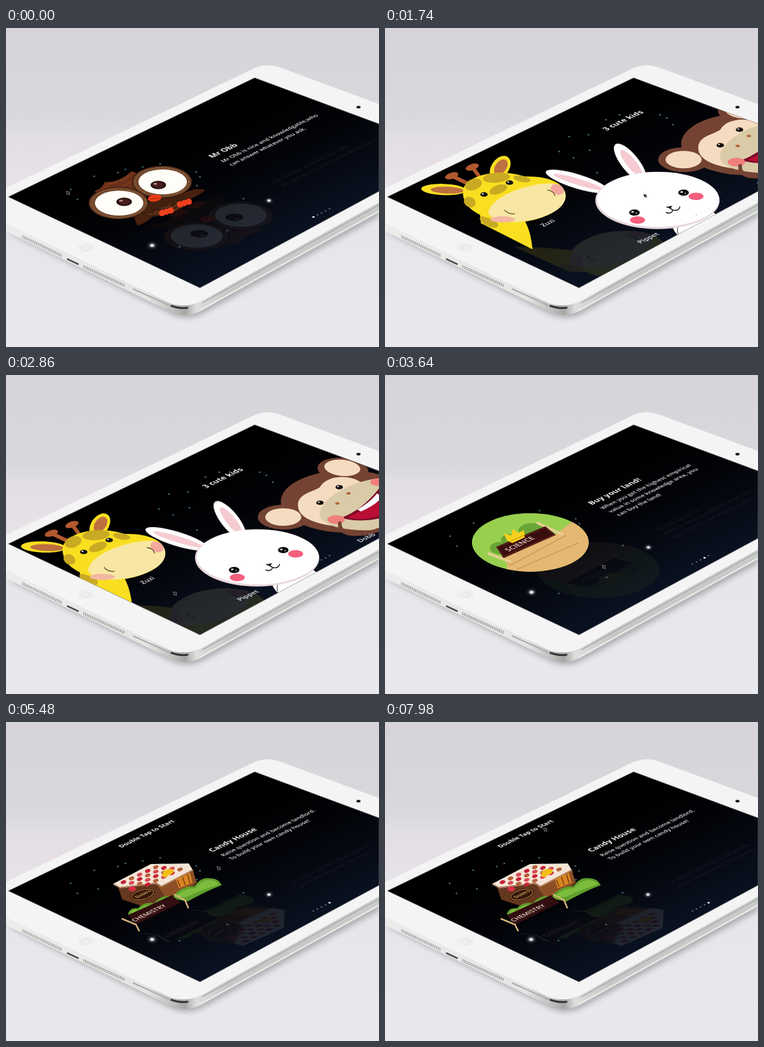
These frames come from a looping animation (600x512 px, 8 s). An HTML page:

```html
<!DOCTYPE html>
<html lang="en">
<head>
<meta charset="utf-8">
<title>Tablet story</title>
<style>
html, body { margin: 0; width: 100%; height: 100%; overflow: hidden; background: #e8e7eb; }
svg { display: block; width: 600px; height: 512px; }
text { font-family: "Open Sans", "Noto Sans", sans-serif; }
</style>
</head>
<body>
<svg id="stage" viewBox="0 0 600 512"></svg>
<script>
// Shape helpers; all art is laid out in stage coordinates.
const oval = (x, y, rx, ry, fill, turn = 0, extra = '') =>
  `<ellipse cx="${x}" cy="${y}" rx="${rx}" ry="${ry}" fill="${fill}" transform="rotate(${turn} ${x} ${y})" ${extra}/>`;
const shape = (d, fill, extra = '') => `<path d="${d}" fill="${fill}" ${extra}/>`;
const line = (d, color, width = 1, extra = '') =>
  `<path d="${d}" fill="none" stroke="${color}" stroke-width="${width}" stroke-linecap="round" ${extra}/>`;
// Text lying on the tilted screen; side = -1 gives its mirror image.
const label = (x, y, size, weight, words, fill = '#e4e4e6', side = 1) =>
  `<text transform="matrix(.9 -.443 ${.88 * side} ${.42 * side} ${x} ${y})" font-size="${size}" font-weight="${weight}" fill="${fill}">${words}</text>`;

const star = ([x, y]) => oval(x, y, 1.6, 1.2, '#3f6b72');
const glow = (x, y, r) => oval(x, y, r * 2, r * 1.5, 'url(#glow)');
const pageStars = [[104, 259], [115, 275], [148, 268], [142, 238], [180, 232], [192, 227], [220, 223], [248, 218],
  [306, 231], [312, 239], [307, 253], [382, 274], [279, 351], [356, 325]].map(star).join('') +
  glow(423, 277, 4) + glow(235, 349, 5);
const kidStars = [[246, 215], [262, 191], [269, 225], [295, 213], [293, 188], [321, 164], [343, 156],
  [408, 156], [419, 161], [429, 172], [307, 249]].map(star).join('');

function copy(title, lines, mirrorX, mirrorY) {
  const last = lines.length - 1;
  return label(332, 209, 12.5, 700, title, '#f2f2f2') + lines.map((words, i) =>
    label(350 + 13 * i, 216 + 5.5 * i, 9.3, 600, words) +
    label(mirrorX + 13 * (last - i), mirrorY + 5.5 * (last - i), 9.3, 600, words, '#151922', -1)).join('');
}

function owl() {
  const eye = (x, y, px, py) =>
    oval(x, y, 48.5, 26, '#2f170e') + oval(x, y, 47, 25, '#6d4429') +
    oval(x, y, 43, 22.5, 'none', 0, 'stroke="#9c6a42" stroke-width="1.5" stroke-dasharray="2 2"') +
    oval(x + 1, y, 39, 20, '#fffdf8') + oval(px, py, 12.5, 6.8, '#28100f') +
    oval(px, py, 9, 4.8, '#471c1b') + oval(px - 5, py - 2, 3, 1.6, '#b28d86');
  const foot = (x, y) => [-7, 0, 7].map(d => oval(x + d, y - d * .3, 5, 5, '#f0401e')).join('');
  return shape('M142 262 Q153 260 159 247 Q180 249 202 230 Q212 232 216 240 L230 270 L160 276Z', '#6b3019') +
    line('M146 261 Q160 260 163 250 Q185 250 203 233 M165 260 Q190 258 207 241', '#a84f28', 1, 'stroke-dasharray="2 1.5"') +
    shape('M278 268 Q300 256 321 259 Q312 269 292 276Z', '#48200f') +
    shape('M206 304 L211 317 Q226 314 238 300 L226 292Z', '#48200f') +
    shape('M215 294 Q248 255 286 262 Q304 278 282 290 Q252 304 228 303Z', '#41200f') +
    [0, 1, 2].map(i => line(`M${228 + i * 12} ${298 - i} q8 4 13 -4 q8 3 12 -6 q8 2 11 -7`, '#7c4126', 1.2)).join('') +
    eye(181, 281, 190, 279) + eye(251, 247, 245, 252) +
    oval(239, 273, 11, 5.5, '#e83c17', -8) + line('M232 274 L246 273', '#8f1f0c', .8) +
    foot(258, 295) + foot(287, 281);
}

function giraffe() {
  const horn = (x, y, tx, ty) => line(`M${x} ${y} L${tx} ${ty}`, '#b2592f', 6) + oval(x, y, 11, 5, '#b2592f', -18);
  const spot = (x, y, rx, ry, turn) => oval(x, y, rx, ry, '#c8aa23', turn);
  return shape('M118 310 L188 322 Q200 340 203 372 L120 330Z', '#f9df20') +
    spot(133, 328, 16, 7, 25) +
    horn(73, 254, 98, 266) + horn(106, 240, 119, 257) +
    oval(60, 276, 36, 9, '#f9df20', 2) + oval(66, 277, 27, 5.5, '#bd7040', 2) +
    oval(151, 241, 14, 21, '#f9df20', 36) + oval(152, 240, 9, 14, '#bd7040', 36) +
    shape('M91 279 C92 255 145 240 190 255 C228 254 254 265 256 284 C258 317 183 338 145 325 C115 319 90 304 91 279Z', '#f9df20') +
    spot(108, 268, 14, 9, -20) + spot(145, 257, 22, 8, -5) + spot(102, 296, 10, 8, 30) +
    spot(186, 259, 14, 5, 10) + spot(148, 276, 15, 7, -20) +
    shape('M132 314 C135 285 205 262 243 267 C260 276 262 295 242 309 C213 329 145 338 132 314Z', '#f8e7a4') +
    oval(155, 324, 20, 5, '#f3b7a2') + oval(243, 276, 11, 8, '#f3a79d', 25) +
    line('M158 309 Q164 316 174 315 M227 277 Q237 278 239 286', '#5b4526', 1.3) +
    oval(125, 284, 6, 3.6, '#111') + oval(123, 283, 1.6, 1, '#fff') +
    oval(166, 265, 6, 3.6, '#111') + oval(164, 264, 1.6, 1, '#fff');
}

function rabbit() {
  const eye = (x, y) => oval(x, y, 8.5, 5, '#0c0c0e') + oval(x - 3, y - 1, 2, 1.3, '#fff') + oval(x + 3, y + 1, 1.2, .8, '#fff');
  const ear = (x, y, rx, ry, turn) => oval(x, y, rx, ry, '#ecdfe2', turn) + oval(x, y, rx - 1, ry - 1, '#fff', turn) +
    oval(x + 2, y + 1, rx - 11, ry - 6.5, '#f5cbd1', turn);
  return shape('M426 331 Q430 344 438 350 L500 317 Q484 304 466 310Z', '#fff') +
    line('M440 332 Q434 338 437 347', '#333') + line('M468 316 Q480 317 486 323', '#d8cdd0') +
    ear(275, 263, 53, 11.5, 17) + ear(360, 233, 38, 14, 51) +
    oval(404, 293.5, 100, 46, '#e8d9de') + oval(405, 292, 98, 44, '#fff') +
    eye(367, 313) + eye(446, 281) + oval(372, 325, 12, 6, '#f35f7d') + oval(466, 287, 12, 6, '#f35f7d') +
    shape('M417 304 L428 302 L425 307Z', '#222') +
    line('M424 306 L429 309 M418 313 Q426 316 429 309 Q438 311 440 304', '#222', 1.6);
}

function monkey() {
  const brown = '#744333', skin = '#f5dcc0';
  const eye = (x, y) => oval(x, y, 6, 3.6, '#171011') + oval(x - 2, y - 1, 1.5, .9, '#fff');
  return oval(548, 203, 106, 50, brown) +
    oval(447, 228, 42, 20, brown) + oval(446, 228, 29, 14, skin) +
    oval(542, 152, 41, 19, brown, 5) + oval(541, 149, 29, 13, skin, 5) +
    shape('M470 213 C466 190 495 188 505 180 C516 160 555 160 570 172 C600 167 625 170 640 190 L610 240 L525 242 C496 238 473 229 470 213Z', skin) +
    shape('M504 224 C507 196 560 165 620 164 L640 240 C600 256 508 252 504 224Z', '#d9cba8') +
    shape('M539 229 Q574 217 604 177 L640 218 Q585 240 546 231Z', '#7e0b28') +
    shape('M550 228 Q582 215 606 187 L630 214 Q585 236 556 230Z', '#b90f35') +
    shape('M565 216 Q585 205 597 190 L605 196 Q594 209 571 219Z', '#fff') +
    oval(531, 232, 14, 7, '#f07f7c') + oval(598, 172, 12, 6, '#f07f7c') +
    oval(533, 206, 3.5, 2, '#b3683a') + oval(551, 190, 3.5, 2, '#b3683a') + eye(505, 205) + eye(536, 180) +
    line('M537 238 Q536 250 549 254 Q580 259 612 243', brown, 6);
}

function land() {
  const post = d => line(d, '#e9cf96', 4);
  return `<g clip-path="url(#island)">` + oval(233, 269, 94, 47, '#98cf4f') +
    [[185, 278, 17, 10], [203, 265, 17, 10], [236, 250, 22, 12]].map(b => oval(...b, '#6aa637')).join('') +
    shape('M184 294 L272 257 L300 236 L340 240 L330 320 L180 325 Q210 305 184 294Z', '#e5b873') +
    line('M192 295 L201 306 L290 258 M212 312 L310 270', '#c99750', 1.2) + '</g>' +
    post('M166 287 L200 300') + post('M245 238 L284 256') +
    shape('M178 276 L257 243 L274 257 L190 294Z', '#390d0e') +
    line('M180 277 L257 245 L271 257 L191 291Z', '#7b3023', 1) +
    shape('M196 266 L190 254 L202 258 L205 247 L213 254 L223 249 L224 261 L204 270Z', '#f6d11c') +
    line('M203 266 L222 258', '#d49a10', 1.5) + label(198, 284, 12, 600, 'SCIENCE', '#f4d9ca');
}

function candyHouse() {
  const sweets = [];
  for (let row = 0; row < 4; row++)
    for (let i = 0; i < 5; i++) {
      const x = 189 + i * 13 + row * 13, y = 257 - i * 6 + row * 1.2;
      sweets.push(oval(x, y, 4.5, 2.8, ['#c72135', '#b5603a', '#d94a55'][(i + row * 2) % 3], -20));
    }
  return shape('M179 261 L187 285 L224 297 L304 263 L302 239 L256 237Z', '#65371e') +
    shape('M245 264 L300 237 L307 258 L258 283Z', '#8c4f25') +
    shape('M273 252 L296 242 L300 258 L278 267Z', '#d98423') +
    line('M276 254 L280 264 M284 249 L288 261 M292 245 L296 258', '#713b12', 1.5) +
    shape('M172 260 L233 228 L294 227 L300 237 L250 263 L242 258 L183 265Z', '#f4e5d6') +
    line('M174 261 L184 266 L240 259 L250 264 L300 238', '#b88767', 2, 'stroke-dasharray="3 2"') +
    sweets.join('') + oval(261, 241, 9, 5, '#f4bd16', -15) + oval(256, 246, 5, 3, '#f4bd16') +
    oval(203, 268, 6, 4, '#d92d48') +
    oval(220, 277, 20, 9, '#341509', -15) +
    oval(220, 277, 18, 7.5, 'none', -15, 'stroke="#bd8a48"') + label(211, 283, 8, 600, 'Dobb’s', '#e3b56c') +
    shape('M196 309 Q199 297 212 299 Q222 288 238 291 Q250 276 268 280 Q284 262 303 264 Q313 248 330 251 Q343 252 347 262 Q325 270 292 288 L270 284 L208 312Z', '#5f9f2c') +
    shape('M200 306 Q204 299 213 302 Q224 291 239 294 Q252 280 269 283 Q286 266 304 267 Q316 252 329 254 Q340 255 342 261 Q318 268 290 281 L268 282 L210 308Z', '#7cbc3c') +
    shape('M196 310 L267 278 L281 290 L210 325Z', '#310e10') +
    label(207, 321, 10.5, 600, 'CHEMISTRY', '#f2d8cd') +
    line('M187 316 L209 325 L214 335 M271 277 L288 286 L293 298', '#d9b37b', 2.5);
}

const labels = label(221, 336, 11, 600, 'Zuzi') + label(377, 363, 11, 600, 'Pippet') +
  label(570, 269, 11, 600, 'Dobb') + label(322, 182, 12.6, 700, '3 cute kids', '#f2f2f2');

const mirror = (art, x, y, opacity) =>
  `<g transform="matrix(0 -.478 -2.09 0 ${x} ${y})" opacity="${opacity}">${art}</g>` + art;
const slides = [
  pageStars + mirror(owl(), 894, 421, .12) +
    copy('Mr Obb', ['Mr Obb is nice and knowledgable,who', 'can answer whatever you ask.'], 428, 247),
  kidStars + mirror(giraffe(), 951, 465, .12) + rabbit() + monkey() + labels,
  pageStars + mirror(land(), 905, 425, .06) +
    copy('Buy your land!', ['When you get the highest empirical', 'value in some knowledge area, you', 'can buy the land!'], 432, 250),
  pageStars + mirror(candyHouse(), 923, 442, .1) + label(186, 202, 10, 700, 'Double Tap to Start', '#f2f2f2') +
    copy('Candy House', ['Raise question and become landlord.', 'To build your own candy house!'], 456, 258)
];

const screen = 'M4 271 L400 80 L600 154 V262 L312 417Z';
const face = 'M0 257 L400 64 Q420 56 440 63 L600 122 V280 L315 438 Q288 451 262 441 L0 313Z';
const body = 'M0 257 L400 64 Q420 56 440 63 L600 122 V296 L312 455 Q290 465 268 457 L0 326Z';
const stops = (...list) => list.map(([at, color, alpha = 1]) =>
  `<stop offset="${at}" stop-color="${color}" stop-opacity="${alpha}"/>`).join('');

document.getElementById('stage').innerHTML = `
<defs>
  <linearGradient id="room" x2="0" y2="1">${stops([0, '#d6d4d9'], [.28, '#d9d8dc'], [.34, '#e1dee4'], [.42, '#e6e0e6'], [.55, '#e6e5e9'], [1, '#e9e8ec'])}</linearGradient>
  <linearGradient id="night" gradientUnits="userSpaceOnUse" x1="270" y1="190" x2="370" y2="392">${stops([0, '#000'], [.35, '#020307'], [1, '#0a1222'])}</linearGradient>
  <linearGradient id="rim" gradientUnits="userSpaceOnUse" x1="0" y1="0" x2="600" y2="0">${stops([0, '#ececeb'], [.38, '#e4e4e2'], [.45, '#bdbdbb'], [.48, '#a5a5a3'], [.51, '#dededc'], [.6, '#c6c8c5'], [1, '#c9cbc8'])}</linearGradient>
  <radialGradient id="glow">${stops([0, '#fff'], [.25, '#e4e8ea', .9], [.5, '#7d878f', .35], [1, '#445', 0])}</radialGradient>
  <filter id="soft" x="-10%" y="-10%" width="120%" height="120%"><feGaussianBlur stdDeviation="5"/></filter>
  <clipPath id="glass"><path d="${screen}"/></clipPath>
  <clipPath id="island"><ellipse cx="233" cy="269" rx="94" ry="47"/></clipPath>
</defs>
<rect width="600" height="512" fill="url(#room)"/>
${shape('M0 326 L268 460 Q292 470 315 459 L600 302 V200 L300 380Z', '#77777c', 'opacity=".55" filter="url(#soft)"')}
${shape(body, 'url(#rim)')}
${line('M312 453 L600 294', '#ececea', 2)}
${line('M316 441 L600 284', '#a9aca8', 1.5)}
${shape(face, '#f4f4f4')}
${line('M205 419 L262 445', '#a8a9a7', 2)}${line('M266 446 Q280 451 292 449', '#343434', 3)}
${[-1.3, 1.3].map(dy => line(`M27 ${335 + dy} L89 ${365 + dy} M125 ${383 + dy} L190 ${413 + dy}`, '#777', 1.7, 'stroke-dasharray=".1 3"')).join('')}
${line('M99 371 L116 379', '#4d4d4d', 2.5)}
${oval(129, 352, 14, 7.5, '#efefef')}${line('M121 353 L130 348 L138 352 L129 357Z', '#e0e0e0', 1)}
${oval(567, 127, 4, 2.4, '#c9cbd0')}${oval(567, 127, 3.2, 2, '#15171c')}
${shape(screen, 'url(#night)', 'stroke="#56575b" stroke-width=".8"')}
<g clip-path="url(#glass)">
  ${slides.map(art => `<g class="slide">${art}</g>`).join('')}
  ${[0, 1, 2, 3, 4].map(i => `<ellipse class="dot" cx="${494.5 + 6.5 * i}" cy="${303.3 - 3.3 * i}" fill="#dfe3ea"/>`).join('')}
</g>
<path id="cursor" d="M-3 -3 L3 -1.5 L1 0 L3 2 L1.5 3 L0 1 L-1.5 2.5Z" fill="#111" stroke="#a9adb2" stroke-width=".7"/>`;

const pages = document.querySelectorAll('.slide');
const dots = document.querySelectorAll('.dot');
const cursor = document.getElementById('cursor');

const swipes = [[1250, 850], [2890, 850], [4640, 850]];
const dotOfPage = [0, 1, 3, 4];
const pointer = [[0, 100, 265], [1050, 463, 245], [1260, 463, 245], [2800, 272, 351], [2880, 272, 351],
  [3500, 352, 308], [4650, 352, 308], [6100, 336, 188], [6500, 336, 188], [7400, 258, 173], [8000, 258, 173]];

const clamp = v => Math.min(1, Math.max(0, v));
const easeOut = v => 1 - (1 - v) ** 3;
const smooth = v => v * v * (3 - 2 * v);

function draw() {
  const t = performance.now() % 8000;
  const position = swipes.reduce((sum, [start, length]) => sum + easeOut(clamp((t - start) / length)), 0);
  pages.forEach((page, i) => {
    const away = i - position;
    page.style.display = Math.abs(away) < 1 ? '' : 'none';
    page.setAttribute('transform', `translate(${away * 455} ${away * -223})`);
  });
  const active = dotOfPage[Math.round(position)];
  dots.forEach((dot, i) => {
    dot.setAttribute('rx', i === active ? 2 : 1.4);
    dot.setAttribute('ry', i === active ? 1.4 : 1);
    dot.setAttribute('opacity', i === active ? 1 : .5);
  });
  const k = pointer.findIndex(([time]) => time > t);
  const [t0, x0, y0] = pointer[k - 1], [t1, x1, y1] = pointer[k];
  const f = smooth((t - t0) / (t1 - t0));
  cursor.setAttribute('transform', `translate(${x0 + (x1 - x0) * f} ${y0 + (y1 - y0) * f})`);
  requestAnimationFrame(draw);
}
draw();
</script>
</body>
</html>
```
